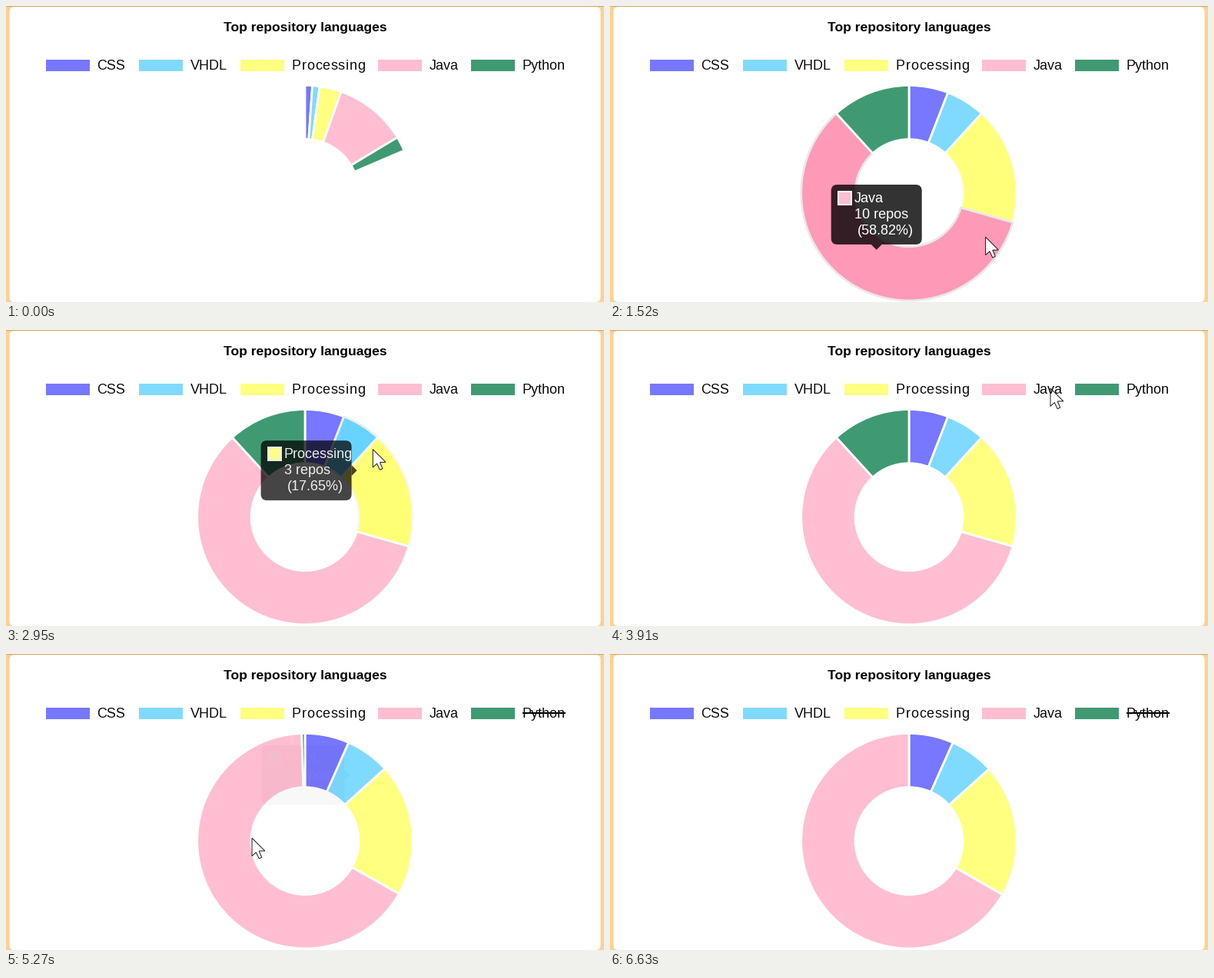
Write a matplotlib script that moves like this. It is 778 by 386 pixels and loops after 7.28 s.

```python
import colorsys

import matplotlib.pyplot as plt
import numpy as np
from matplotlib.animation import FuncAnimation
from matplotlib.colors import to_rgb
from matplotlib.patches import Circle, FancyBboxPatch, Polygon, Rectangle, Wedge

W, H, DPI = 778, 386, 100
LOOP, STEP = 7280, 28
PT = 72 / DPI                      # points per pixel
CX, CY, R_OUT, R_IN = 389, 243.8, 140.3, 70
R_TIP = 107                        # radius the tooltips point at
TIP_H, TIP_GAP, CARET = 78, 12, 7
PRESS, CLICK = 4530, 4730
APPEAR, LEAVE = 540, 6560

NAMES = ["CSS", "VHDL", "Processing", "Java", "Python"]
COLORS = [to_rgb(c) for c in ("#7777ff", "#80daff", "#ffff80", "#ffbed2", "#3f9a72")]
BOX_X = [52, 173, 305, 484, 605]
COUNTS = np.array([1, 1, 3, 10, 2])
KEPT = np.array([1, 1, 3, 10, 0])
PYTHON = 4


def ease(u):
    return 1 - (1 - np.clip(u, 0, 1)) ** 4


# ---- chart geometry

def counts_at(t):
    return COUNTS if t < CLICK else KEPT


def sweep(t):
    """Angle in degrees taken by each slice."""
    before = COUNTS / COUNTS.sum() * 360 * ease((t + 36) / 1000)
    after = KEPT / KEPT.sum() * 360
    return before + (after - before) * ease((t - CLICK) / 1000)


def polar(deg, r):
    """Point at a clockwise angle from the top of the ring."""
    a = np.radians(deg)
    return CX + r * np.sin(a), CY - r * np.cos(a)


def arc(a, b, r=115, n=6):
    return [polar(deg, r) for deg in np.linspace(a, b, n)]


# ---- pointer: each stroke has a start, an end and the points it runs through

STROKES = [(APPEAR, 615, [(147, 88)]),
           (820, 1420, arc(-30, 120)),
           (1590, 2130, arc(120, 312)),
           (2320, 2325, [(292, 205)]),
           (2450, 3300, [(400, 210), (465, 150), (498, 165), (531, 81)]),
           (3850, 3900, [(573, 76)]),
           (3925, 4260, [(612, 77)]),
           (4780, 5275, [(452, 155), (420, 205), (320, 240)]),
           (5330, 5700, [(280, 262)]),
           (6110, 6200, [(425, 279)]),
           (6210, 6480, [(660, 358)])]


def join_strokes():
    times, points = [0], [(129, 79)]
    for start, end, stops in STROKES:
        times += list(np.linspace(start, end, len(stops) + 1))
        points += [points[-1], *stops]
    return times, np.array(points)


TIMES, POINTS = join_strokes()


def pointer_at(t):
    return np.array([np.interp(t, TIMES, POINTS[:, k]) for k in (0, 1)])


def hovered(t):
    """Index of the slice under the pointer, or None."""
    x, y = pointer_at(t) - (CX, CY)
    if not (APPEAR <= t < LEAVE and R_IN <= np.hypot(x, y) <= R_OUT):
        return None
    deg = np.degrees(np.arctan2(x, -y)) % 360
    i = int(np.searchsorted(np.cumsum(sweep(t)), deg))
    return i if i < len(NAMES) else None


# ---- hover fades and tooltip motion

def share(i, t):
    return counts_at(t)[i] / counts_at(t).sum()


def tip_layout(i, t):
    """Top left corner, width and caret side of the tooltip of slice i."""
    counts = counts_at(t)
    mid = (counts[:i].sum() + counts[i] / 2) / counts.sum() * 360
    x, y = polar(mid, R_TIP)
    w = 118 if share(i, t) >= 0.1 else 108
    if y > H - TIP_H:
        return x - w / 2, y - TIP_GAP - TIP_H, w, "bottom"
    if x > CX:
        return x - TIP_GAP - w, y - TIP_H / 2, w, "right"
    return x + TIP_GAP, y - TIP_H / 2, w, "left"


def find_events():
    """Times at which the hovered slice changes."""
    events, last = [], None
    for t in range(0, LOOP, 10):
        i = hovered(t)
        if i != last:
            events.append((t, i))
            last = i
    return events


def find_goals():
    """Per event: a hover level for each slice, tooltip opacity, x and y."""
    goals, spot = [], (0, 0)
    for when, i in EVENTS:
        goal = np.zeros(8)
        if i is not None:
            goal[[i, 5]] = 1
            spot = tip_layout(i, when)[:2]
        goal[6:] = spot
        goals.append((when, goal))
    return goals


EVENTS = find_events()
GOALS = find_goals()


def hover_state(t):
    start = GOALS[0][1].copy()
    start[:6] = 0
    goal, t0 = start, 0
    for when, levels in GOALS:
        if when > t:
            break
        start = start + (goal - start) * ease((when - t0) / 400)
        goal, t0 = levels, when
    return start + (goal - start) * ease((t - t0) / 400)


def hover_color(rgb):
    h, l, s = colorsys.rgb_to_hls(*rgb)
    return np.array(colorsys.hls_to_rgb(h, l * 0.9, min(1, s * 1.5)))


HOVER_COLORS = [hover_color(c) for c in COLORS]

# ---- scene

fig = plt.figure(figsize=(W / 100, H / 100), dpi=DPI, facecolor="#fdd094")
ax = fig.add_axes([0, 0, 1, 1])
ax.set_xlim(0, W)
ax.set_ylim(H, 0)
ax.axis("off")


def add(patch):
    return ax.add_patch(patch)


def label(x, y, s, size=18, **style):
    return ax.text(x, y, s, fontsize=size * PT, family="Liberation Sans", **style)


def spaced_label(x, y, s, gap, **style):
    """Text with extra space between its letters."""
    probe = label(x, y, "n")
    font = probe.get_fontproperties()
    probe.remove()
    renderer = fig.canvas.get_renderer()

    def width(part):
        return renderer.get_text_width_height_descent(part, font, False)[0]

    for k, letter in enumerate(s):
        advance = width("n" + s[:k] + "n") - width("nn")
        label(x + advance + k * gap, y, letter, **style)


add(Rectangle((0, 0), W, 1, fc="#d2a56c", lw=0))
add(FancyBboxPatch((4.5, 1.2), 769, 384.8, fc="white", lw=0,
                   boxstyle="round,pad=0,rounding_size=6"))
label(389, 33, "Top repository languages", 17.5, weight="bold", ha="center",
      color="black")
for name, color, x in zip(NAMES, COLORS, BOX_X):
    add(Rectangle((x, 70), 57, 15, fc=color, lw=0))
    if name == "Processing":
        spaced_label(x + 67, 83, name, 0.65, color="#0c0c0c")
    else:
        label(x + 66.6, 83, name, color="#0c0c0c")
strike = add(Rectangle((672.5, 75.7), 55.5, 2.6, fc="black", lw=0))

slices = [add(Wedge((CX, CY), R_OUT, 0, 1, width=R_OUT - R_IN, lw=2.8 * PT,
                    joinstyle="bevel")) for _ in NAMES]

bubble = add(FancyBboxPatch((0, 0), 118, TIP_H, lw=0,
                            boxstyle="round,pad=0,rounding_size=8"))
caret = add(Polygon([(0, 0), (1, 0), (0, 1)], lw=0))
frame_box = add(Rectangle((0, 0), 19, 19, fc="white", lw=0))
swatch = add(Rectangle((0, 0), 15, 15, lw=0))
lines = [label(0, 0, "", color="white") for _ in range(3)]
tip_parts = [bubble, caret, frame_box, swatch, *lines]

ring = add(Circle((612, 77), 18, fc=(1, 1, 0, 0.47), lw=0))
ARROW = np.array([(0, 0), (0, 23.5), (5.3, 18.6), (9.2, 26.8), (12.7, 25.2),
                  (9.2, 17), (16.8, 16.8)])
pointer = add(Polygon(ARROW, fc="white", ec="#1c1c1c", lw=PT))


def draw_slices(t, levels):
    begin = -90
    for i, (wedge, size) in enumerate(zip(slices, sweep(t))):
        wedge.set_theta1(begin)
        wedge.set_theta2(begin + size)
        base = np.array(COLORS[i])
        wedge.set_facecolor(base + (HOVER_COLORS[i] - base) * levels[i])
        wedge.set_edgecolor([1 - 0.11 * levels[i]] * 3)
        begin += size
    slices[PYTHON].set_visible(t < CLICK + 1000)


def draw_tip(t, alpha, x, y):
    for part in tip_parts:
        part.set_visible(alpha > 0.01)
    if alpha <= 0.01:
        return
    when, i = [e for e in EVENTS if e[0] <= t and e[1] is not None][-1]
    _, _, w, side = tip_layout(i, when)
    bubble.set_bounds(x, y, w, TIP_H)
    mx, my = x + w / 2, y + TIP_H / 2
    if side == "bottom":
        base = y + TIP_H
        caret.set_xy([(mx - CARET, base), (mx + CARET, base), (mx, base + CARET)])
    else:
        base, out = (x, -CARET) if side == "left" else (x + w, CARET)
        caret.set_xy([(base, my - CARET), (base, my + CARET), (base + out, my)])
    for part in (bubble, caret):
        part.set_facecolor((0, 0, 0, 0.8 * alpha))
    frame_box.set_xy((x + 8, y + 8))
    frame_box.set_alpha(alpha)
    swatch.set_xy((x + 10, y + 10))
    swatch.set_facecolor((*COLORS[i], alpha))
    texts = [NAMES[i], f"{COUNTS[i]} repos", f"({100 * share(i, when):.2f}%)"]
    for k, (line, s) in enumerate(zip(lines, texts)):
        line.set_text(s)
        line.set_position((x + (34 if k == 2 else 30), y + 23 + 21 * k))
        line.set_alpha(alpha)


def draw(frame):
    t = (frame + 0.5) * STEP
    state = hover_state(t)
    draw_slices(t, state[:5])
    draw_tip(t, *state[5:])
    strike.set_visible(t >= CLICK)
    ring.set_visible(PRESS <= t < CLICK)
    pointer.set_visible(APPEAR <= t < LEAVE)
    pointer.set_xy(ARROW + pointer_at(t))
    return slices + tip_parts + [strike, ring, pointer]


anim = FuncAnimation(fig, draw, frames=LOOP // STEP, interval=STEP,
                     init_func=lambda: draw(0), repeat=True)
plt.show()
```
